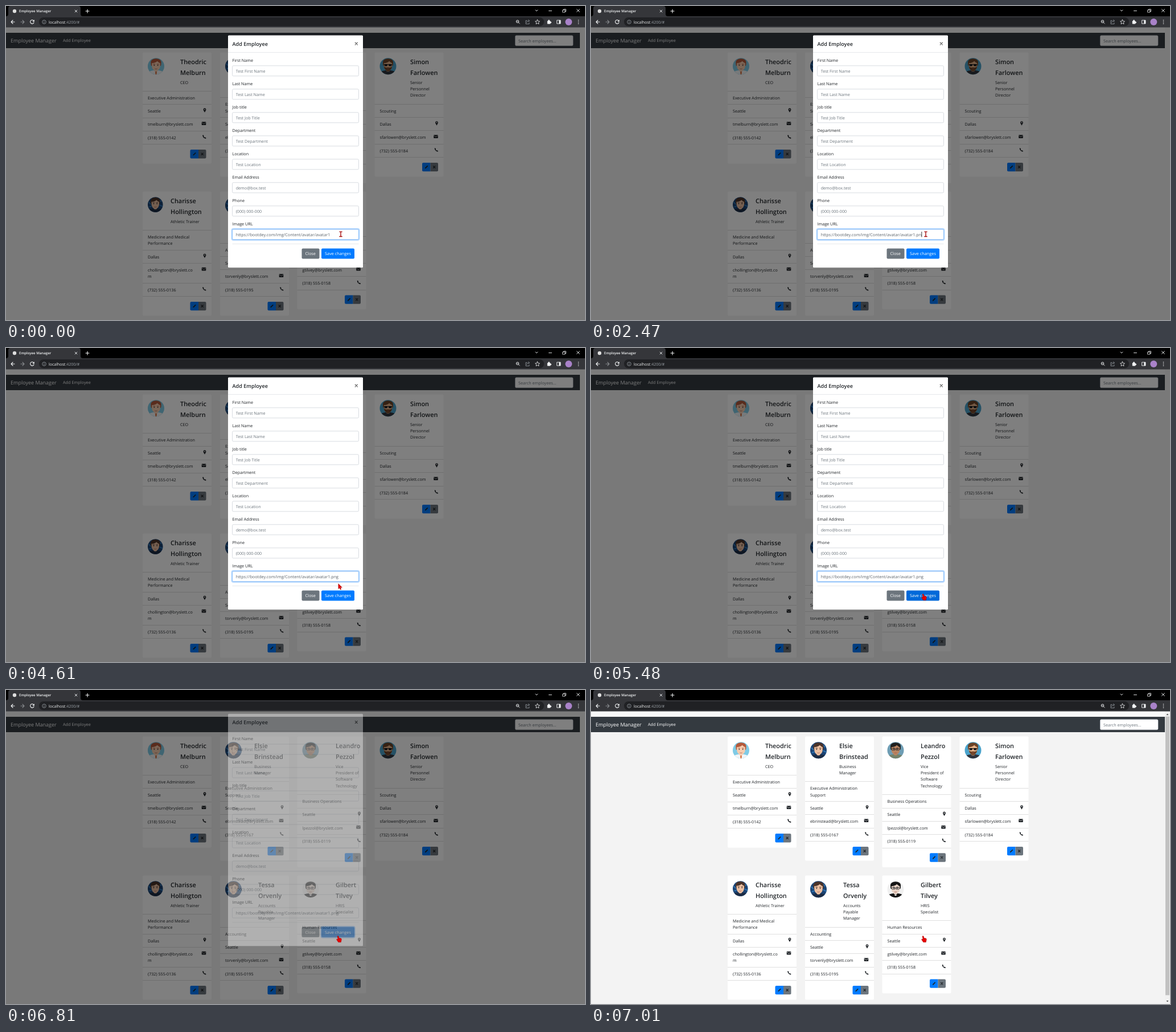
Write an HTML page that moves like this. It is 1017 px wide and 551 px high and loops after 8 s.

```html
<!DOCTYPE html>
<html lang="en">
<head>
<meta charset="utf-8">
<title>Employee Manager</title>
<style>
  html, body { margin: 0; width: 100%; height: 100%; overflow: hidden; background: #f3f3f3; }
  svg { display: block; font-family: "Open Sans", "Noto Sans", sans-serif; text-rendering: geometricPrecision; }
  text { white-space: pre; }
  .line { fill: none; stroke-linecap: round; stroke-linejoin: round; }
</style>
</head>
<body>
<svg id="stage" width="1017" height="551" viewBox="0 0 1017 551"></svg>
<script>
const INK = '#212529', BLUE = '#007bff', GREY = '#6c757d';
const SEMIBOLD = 'font-weight="600"';
const stage = document.getElementById('stage');

// y is the middle of the capitals
const text = (x, y, s, size = 7.2, fill = INK, attrs = '') =>
  `<text x="${x}" y="${y + size * 0.36}" font-size="${size}" fill="${fill}" ${attrs}>${s}</text>`;
const rect = (x, y, w, h, fill, attrs = '') =>
  `<rect x="${x}" y="${y}" width="${w}" height="${h}" fill="${fill}" ${attrs}/>`;
const circle = (x, y, r, fill, attrs = '') =>
  `<circle cx="${x}" cy="${y}" r="${r}" fill="${fill}" ${attrs}/>`;
const shape = (d, fill, attrs = '') => `<path d="${d}" fill="${fill}" ${attrs}/>`;
const stroke = (d, color, width = 1) =>
  `<path class="line" d="${d}" stroke="${color}" stroke-width="${width}"/>`;
const at = (x, y, body) => `<g transform="translate(${x} ${y})">${body}</g>`;
const cross = (x, y, r, color, width) =>
  stroke(`M${x - r} ${y - r}l${2 * r} ${2 * r}m0 ${-2 * r}l${-2 * r} ${2 * r}`, color, width);

const icons = {
  pin: shape('M0 4C-1.2 1.5-2.4.6-2.4-1.2a2.4 2.4 0 0 1 4.8 0C2.4.6 1.2 1.5 0 4z', INK) + circle(0, -1.3, 0.9, '#fff'),
  mail: rect(-3.8, -2.9, 7.6, 5.8, INK, 'rx=".8"') + stroke('M-3.5-1.7L0 .8 3.5-1.7', '#fff', 0.6),
  phone: stroke('M-2.2-2.2C-2 .5-.5 2 2.2 2.3', INK, 1.2) +
    stroke('M-2.2-2.4l.7 1.3M2.3 2.2L1 1.5', INK, 1.7),
  pencil: stroke('M-1.3 1.3L1.7-1.7', INK, 1.7) + shape('M-2.6 2.6l.4-1.9 1.5 1.5z', INK)
};

const looks = {
  ginger: { bg: '#7fcbe6', hair: '#b4593a', skin: '#f6cdb0', shirt: '#f2f5f7', tie: '#d8703c' },
  navy: { bg: '#1b4373', glow: '#2f75b5', hair: '#4b3329', skin: '#ecc0a2', shirt: '#1c2c45' },
  glasses: { bg: '#6e9db4', hair: '#20201f', skin: '#b98562', shirt: '#75826a', specs: 1 },
  shades: { bg: '#4aa3cc', hair: '#6b4327', skin: '#e8b48a', shirt: '#30343c', shades: 1, beard: 1 },
  dark: { bg: '#f0f0f0', hair: '#161616', skin: '#e8d3c6', shirt: '#151515', specs: 1, collar: 1 }
};

function avatar(x, y, r, name) {
  const a = looks[name];
  let s = circle(0, 0, 14.5, a.bg);
  if (a.glow) s += stroke('M-12-4l3 3M-11 4l3-1M8-9l3 3M9 1l4 2M-8-10l2 2', a.glow, 2);
  s += shape('M-11.3 9Q-8 7.4-3 7H3Q8 7.4 11.3 9A14.5 14.5 0 0 1-11.3 9z', a.shirt);
  if (a.tie) s += shape('M-1.4 9h2.8L1 14.3h-2z', a.tie);
  if (a.collar) s += rect(-1.5, 9.4, 3, 1.8, '#fff');
  let head = rect(-2.8, 3, 5.6, 5, a.skin, 'rx="2"') +
    `<ellipse cy="-6.4" rx="8.2" ry="5.8" fill="${a.hair}"/>` + rect(-8, -7, 16, 6.5, a.hair, 'rx="2"') +
    shape('M-6.5-5Q-1-5 2-8 4-5.5 6.5-5V0Q6 6 0 7.5-6 6-6.5 0z', a.skin);
  if (a.beard) head += shape('M-6.4 0Q-4 3 0 1.5 4 3 6.4 0 6 6 0 7.8-6 6-6.4 0z', a.hair);
  if (a.shades) head += rect(-5.8, -3.3, 5, 3, '#17191d', 'rx="1.2"') + rect(0.8, -3.3, 5, 3, '#17191d', 'rx="1.2"') + stroke('M-6-3H6', '#17191d', 0.8);
  else head += circle(-2.8, -1.5, 0.8, INK) + circle(2.8, -1.5, 0.8, INK) + stroke('M-4.2-3.4h2.6M1.6-3.4h2.6', a.hair, 0.8);
  if (a.specs) head += stroke('M-5.3-2.7h4.2v2.6h-4.2zM1.1-2.7h4.2v2.6H1.1zM-1.1-2h2.2', INK, 0.6);
  head += stroke('M-1.6 4Q0 4.8 1.6 4', '#a65a4b', 0.7);
  return `<g transform="translate(${x} ${y}) scale(${r / 14.5})">${s}<g transform="scale(1.12)">${head}</g></g>`;
}

const people = [
  { x: 240, y: 82, nameX: 306, look: 'ginger', name: ['Theodric', 'Melburn'], job: ['CEO'],
    dept: ['Executive Administration'], city: 'Seattle', mail: ['tmelburn@bryslett.com'], phone: '(318) 555-0142' },
  { x: 376, y: 82, nameX: 436, look: 'navy', name: ['Elsie', 'Brinstead'], job: ['Business', 'Manager'],
    dept: ['Executive Administration', 'Support'], city: 'Seattle', mail: ['ebrinstead@bryslett.com'], phone: '(318) 555-0167' },
  { x: 511.5, y: 82, nameX: 579, look: 'glasses', name: ['Leandro', 'Pezzol'], job: ['Vice', 'President of', 'Software', 'Technology'],
    dept: ['Business Operations'], city: 'Seattle', mail: ['lpezzol@bryslett.com'], phone: '(318) 555-0119' },
  { x: 647.5, y: 82, nameX: 710, look: 'shades', name: ['Simon', 'Farlowen'], job: ['Senior', 'Personnel', 'Director'],
    dept: ['Scouting'], city: 'Dallas', mail: ['sfarlowen@bryslett.com'], phone: '(732) 555-0184' },
  { x: 240, y: 326, nameX: 289, look: 'navy', r: 13.3, name: ['Charisse', 'Hollington'], job: ['Athletic Trainer'],
    dept: ['Medicine and Medical', 'Performance'], city: 'Dallas', mail: ['chollington@bryslett.co', 'm'], phone: '(732) 555-0136' },
  { x: 376, y: 326, nameX: 443, look: 'navy', name: ['Tessa', 'Orvenly'], job: ['Accounts', 'Payable', 'Manager'],
    dept: ['Accounting'], city: 'Seattle', mail: ['torvenly@bryslett.com'], phone: '(318) 555-0195' },
  { x: 511.5, y: 326, nameX: 579, look: 'dark', name: ['Gilbert', 'Tilvey'], job: ['HRIS', 'Specialist'],
    dept: ['Human Resources'], city: 'Seattle', mail: ['gtilvey@bryslett.com'], phone: '(318) 555-0158' }
];

function card(p) {
  const { x, y, r = 14.5 } = p, lead = 11.45;
  let s = avatar(x + 9 + r, y + 9.3 + r, r, p.look);
  p.name.forEach((n, i) => s += text(p.nameX, y + 16.2 + i * 18.5, n, 10.9, INK, SEMIBOLD));
  p.job.forEach((j, i) => s += text(p.nameX, y + 52 + i * lead, j));
  let top = y + 67.3 + (p.job.length - 1) * lead;
  const rule = () => rect(x, Math.floor(top), 121, 1, '#dfdfdf');
  const rows = [[p.dept], [[p.city], 'pin', 109], [p.mail, 'mail', 107.5], [[p.phone], 'phone', 108.3]];
  for (const [lines, icon, dx] of rows) {
    s += rule();
    lines.forEach((l, i) => s += text(x + 9, top + 11.9 + i * lead, l));
    if (icon) s += at(x + dx, top + 10.2, icons[icon]);
    top += 23.35 + (lines.length - 1) * lead;
  }
  s += rule();
  s += shape(`M${x + 98} ${top + 9.3}h-12.5q-2 0-2 2v11.4q0 2 2 2h12.5z`, BLUE);
  s += shape(`M${x + 98} ${top + 9.3}h11.5q2 0 2 2v11.4q0 2-2 2h-11.5z`, GREY);
  s += at(x + 91, top + 17, icons.pencil) + cross(x + 104.7, top + 17, 1.6, INK, 1.3);
  return rect(x, y - 0.5, 121, top + 34.5 - y, '#fff', 'rx="2"') + s;
}

function browser() {
  const w = '#f1f3f4', g = '#9aa0a6';
  return rect(0, 0, 1017, 18, '#000') + rect(0, 18, 1017, 19.5, '#35363a') +
    shape('M0 18q4 0 4-4V4q0-4 4-4H127q4 0 4 4v10q0 4 4 4z', '#35363a') +
    circle(15, 9, 3.2, '#dedede') +
    text(23, 9, 'Employee Manager', 6.1, w, SEMIBOLD) +
    cross(123, 9, 1.9, w, 0.9) + stroke('M140 9h6M143 6v6', w, 1.1) +
    stroke('M930 7l2 2 2-2M953.5 8.5h5', w, 0.9) +
    stroke('M978 7h4v4h-4zM979.5 7V5.7h4v4H982', w, 0.8) + cross(1005, 8, 2.4, w, 0.9) +
    rect(58, 20, 887, 15.5, '#202124', 'rx="7.7"') +
    stroke('M15 28H9m3-3l-3 3 3 3', w, 1.1) + stroke('M26 28h6m-3-3l3 3-3 3', '#85888c', 1.1) +
    stroke('M48.7 26A3.3 3.3 0 1 0 49 29', w, 1.1) + shape('M49.8 24v3.4h-3.4z', w) +
    circle(67, 28, 3.3, 'none', `stroke="${g}" stroke-width=".8"`) + stroke('M67 27.8v1.8M67 26.2v.1', g, 0.8) +
    text(75, 28, `localhost<tspan fill="${g}">:4200/#</tspan>`, 7, w) +
    circle(898.5, 27.2, 2.3, 'none', `stroke="${w}" stroke-width=".9"`) + stroke('M900.3 29l2 2M897.5 27.2h2', w, 0.8) +
    stroke('M915 25.5h-2v6h6v-2M914.5 29q.3-3 4.5-3m-1.5-1.8l2 1.8-2 1.8', g, 0.8) +
    stroke('M933.5 24l1.2 2.6 2.8.3-2.1 1.9.6 2.8-2.5-1.4-2.5 1.4.6-2.8-2.1-1.9 2.8-.3z', w, 0.8) +
    rect(950.8, 26, 5.6, 5.6, w, 'rx=".8"') + circle(953.6, 25.6, 1.4, w) + circle(956.7, 28.8, 1.4, w) +
    stroke('M968 25h6v6h-6z', w, 0.9) + rect(971.3, 25, 2.7, 6, w) +
    circle(988.3, 28, 6, '#a982c9') +
    [25, 28, 31].map(y => circle(1005.5, y, 0.8, w)).join('');
}

const page = () => rect(0, 37, 1017, 514, '#f3f3f3') + rect(0, 37, 1008, 10, '#f9f9f9') +
  rect(0, 47, 1008, 27, '#343a40') +
  text(8, 60.7, 'Employee Manager', 9, '#fff') + text(100, 60.7, 'Add Employee', 7.3, '#fff') +
  rect(894.4, 51.8, 101.6, 17.9, '#fff', 'rx="2" stroke="#ced4da" stroke-width=".6"') +
  text(900, 61, 'Search employees...', 7.2, GREY) + people.map(card).join('');

const scrollbar = rect(1008, 37.5, 9, 513.5, '#f1f1f1') + rect(1009, 46.5, 7, 489, '#c1c1c1') +
  shape('M1010.5 44l2-2.5 2 2.5z', '#505050') + shape('M1010.5 545l2 2.5 2-2.5z', '#505050');

const fields = [
  ['First Name', 'Test First Name'], ['Last Name', 'Test Last Name'], ['Job title', 'Test Job Title'],
  ['Department', 'Test Department'], ['Location', 'Test Location'], ['Email Address', 'demo@box.test'],
  ['Phone', '(000) 000-000'], ['Image URL', '']
];

function modal() {
  let s = rect(390, 51.5, 237, 407.5, '#fff', 'rx="1.5"') +
    text(397.5, 66.7, 'Add Employee', 9.1, INK, SEMIBOLD) +
    cross(615.3, 66.2, 2, '#444', 1.1) + rect(390, 81, 237, 1, '#e6e9ec');
  fields.forEach(([label, value], i) => {
    const y = 95 + i * 41;
    s += text(397.5, y, label) +
      rect(397.5, y + 9.8, 222, 18, '#fff', 'rx="2" stroke="#ced4da" stroke-width=".8"') +
      text(403.7, y + 19, value, 7.2, GREY);
  });
  const ring = 'rx="2.5" stroke="#007bff" stroke-opacity=".28" stroke-width="1.7"';
  return s + `<g id="inputFocus">${rect(396.4, 390.8, 224.2, 20, 'none', ring)}` +
    rect(397.5, 391.8, 222, 18, 'none', 'rx="2" stroke="#80bdff" stroke-width=".9"') + '</g>' +
    text(403.7, 401, '', 7.25, '#5a626a', 'id="url"') +
    rect(0, 396, 0.9, 9.5, '#222', 'id="caret"') +
    rect(397.5, 417, 222, 1, '#e6e9ec') +
    rect(519.5, 425.5, 31, 18, GREY, 'rx="2"') + text(525.5, 434.7, 'Close', 7.3, '#fff') +
    rect(553.3, 424.7, 59.4, 19.6, 'none', 'id="saveFocus" rx="3" stroke="#268fff" stroke-opacity=".5" stroke-width="1.8"') +
    rect(554, 425.5, 58, 18, BLUE, 'id="save" rx="2"') +
    text(583, 434.7, 'Save changes', 7.3, '#fff', 'text-anchor="middle"');
}

const pointers = `<g id="beam">${stroke('M-2.2-4.2h4.4M0-4v8M-2.2 4.2h4.4', '#a90f0f', 1.4)}</g>` +
  `<g id="arrow">${shape('M-2.5-5v9l2-1.8 1.4 3.1 1.5-.7-1.4-3H4z', '#e80000', 'stroke="#800" stroke-width=".5"')}</g>` +
  `<g id="hand">${shape('M-2.6-4.8q1-1.6 2 0l.8 3 3.2.6q1.5.5 1.1 2.4l-.9 4.4h-4.6l-3-4.6q0-1.4 1.3-.9l1.2.9z', '#e80000', 'stroke="#900" stroke-width=".5"')}</g>`;

stage.innerHTML = page() + rect(0, 37, 1017, 514, '#000', 'id="shade"') + `<g id="scroll">${scrollbar}</g>` +
  browser() + `<g id="modal">${modal()}</g><g id="cursor">${pointers}</g>`;

const el = {};
stage.querySelectorAll('[id]').forEach(n => el[n.id] = n);
const show = (n, on) => n.setAttribute('visibility', on ? 'visible' : 'hidden');

const typed = [[1020, '.'], [2310, 'p'], [2470, 'n'], [2880, 'g']];
const blinks = [570, 1590, 2060, 3400, 3850, 4300, 4910, 5480];

function draw(t) {
  const url = 'https://bootdey.com/img/Content/avatar/avatar1' +
    typed.filter(k => t >= k[0]).map(k => k[1]).join('');
  if (el.url.textContent !== url) el.url.textContent = url;
  el.caret.setAttribute('x', 404 + el.url.getComputedTextLength());

  // the pointer travels from the field to the button in eight steps
  const k = t < 4300 ? 0 : Math.min(8, Math.floor((t - 4300) / 87.1) + 1) / 8;
  const ease = k * k * (3 - 2 * k), y = 400.3 + 36.7 * ease;
  el.cursor.setAttribute('transform', `translate(${588 - 3.3 * ease} ${y})`);
  show(el.beam, y < 411);
  show(el.arrow, y >= 411 && y < 428);
  show(el.hand, y >= 428);
  el.save.setAttribute('fill', y >= 428 ? '#0069d9' : BLUE);

  const clicked = t >= 6190, closing = t >= 6810, gone = t >= 6940, done = t >= 7010;
  el.modal.style.display = gone ? 'none' : '';
  show(el.caret, blinks.filter(b => t >= b).length % 2);
  show(el.inputFocus, !clicked);
  show(el.saveFocus, clicked);
  el.modal.setAttribute('opacity', closing ? 0.38 : 1);
  el.modal.setAttribute('transform', `translate(0 ${closing ? -9.8 : 0})`);
  el.shade.setAttribute('opacity', done ? 0 : gone ? 0.16 : 0.5);
  show(el.scroll, done);
}

const start = performance.now();
(function tick() {
  draw((performance.now() - start) % 8000);
  requestAnimationFrame(tick);
})();
</script>
</body>
</html>
```
